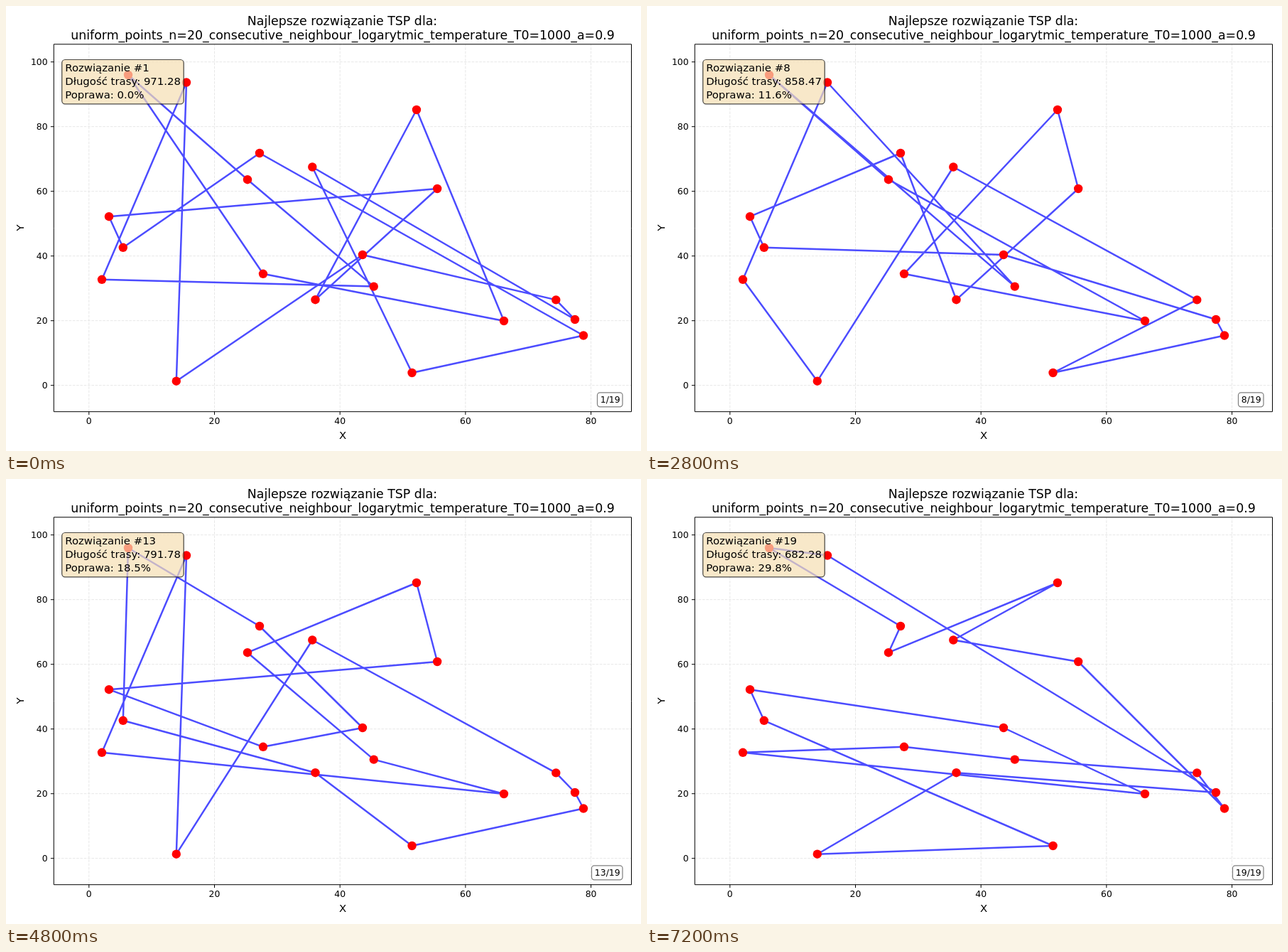
An HTML page with a canvas that plays this animation: 894 px wide and 626 px high, repeating every 7600 ms.

```html
<!DOCTYPE html>
<html lang="pl">
<head>
<meta charset="utf-8">
<style>
  html, body { margin: 0; width: 100%; height: 100%; overflow: hidden; background: #fff; }
  canvas { display: block; }
</style>
</head>
<body>
<canvas id="stage" width="894" height="626"></canvas>
<script>
const c = document.getElementById('stage').getContext('2d');
const STEP = 400;
const PT = 0.894 * 100 / 72; // pixels per typographic point
const LEFT = 67.3, RIGHT = 880.5, TOP = 53.8, BOTTOM = 570.7;

// Cities A..T in stage pixels
const cities = [
  [172, 97], [254, 107.5], [578, 146], [357, 207], [431.3, 226.5],
  [340, 244.2], [607.2, 257], [145, 296.2], [164.8, 339.8], [135, 384.8],
  [362, 376.8], [502, 350], [517.8, 394.6], [435.5, 413.2], [774.3, 413.4],
  [801, 441], [813, 463.5], [701, 443], [571.6, 516], [239.8, 527.7]
];

// Visiting order and route length of each improved solution
const tours = [
  ['BJMFAKRCNGHIDQSEPOLT', 971.28],
  ['BJMFAKRCNGDHIQSEPOLT', 945.02],
  ['BJMFAKRCGNDHIQSEPOLT', 924.51],
  ['BJMAFKRCGNDHIQSELPOT', 913.40],
  ['BJTPOLESQHIDNGCKRFAM', 907.83],
  ['BJTPOLEQSHIDNGCKRFAM', 894.09],
  ['BJTEOSQPLHIDNGCKRFAM', 867.76],
  ['BJTEOSQPLIHDNGCKRFAM', 858.47],
  ['BJTEOSQPLINDKHAGFCRM', 844.13],
  ['BJTEOSQPLINDKHAGCFRM', 831.52],
  ['BJTEOQPSLINDKHAGCFRM', 810.24],
  ['BJTEOPQSLINDKHAGCFRM', 804.11],
  ['JBTEOPQSNIADLKHGCFMR', 791.78],
  ['BJTEOPQSNIADLKHGFCMR', 779.24],
  ['BJTEOPQSNIADKLHGCFMR', 770.83],
  ['BJTEOPQSNIADLKHGCFMR', 757.13],
  ['BCDEFQOGMLKJHRISTPNA', 739.94],
  ['BANPTSIRHJKLMOQGFEDC', 707.37],
  ['ABPNTSIHLRJKMOQGECFD', 682.28]
];

function text(str, x, y, size, align) {
  c.font = size * PT + 'px "DejaVu Sans", sans-serif';
  c.textAlign = align;
  c.fillStyle = '#000';
  c.fillText(str, x, y);
}

function line(x1, y1, x2, y2) {
  c.beginPath();
  c.moveTo(x1, y1);
  c.lineTo(x2, y2);
  c.stroke();
}

function box(x, y, w, h, r, fill, edge) {
  c.beginPath();
  c.roundRect(x, y, w, h, r);
  c.fillStyle = fill;
  c.fill();
  c.strokeStyle = edge;
  c.lineWidth = PT;
  c.stroke();
}

function tick(grid, mark) {
  c.strokeStyle = '#e7e7e7';
  c.setLineDash([3.7, 1.6]);
  line(...grid);
  c.strokeStyle = '#000';
  c.setLineDash([]);
  line(...mark);
}

function axes() {
  c.lineWidth = 1;
  for (let i = 0; i < 5; i++) {
    const x = 116.8 + i * 176.7;
    tick([x, BOTTOM, x, TOP], [x, BOTTOM, x, BOTTOM + 4.4]);
    text(i * 20, x, 588.3, 10, 'center');
  }
  for (let i = 0; i < 6; i++) {
    const y = 533.7 - i * 91;
    tick([LEFT, y, RIGHT, y], [LEFT - 4.4, y, LEFT, y]);
    text(i * 20, 58.6, y + 4.6, 10, 'right');
  }
  text('X', 474, 609, 12, 'center');
  c.save();
  c.translate(25, 312);
  c.rotate(-Math.PI / 2);
  text('Y', 0, 0, 12, 'center');
  c.restore();
  text('Najlepsze rozwiązanie TSP dla:', 473.5, 26.7, 14, 'center');
  text('uniform_points_n=20_consecutive_neighbour_logarytmic_temperature_T0=1000_a=0.9',
    474, 46.6, 14, 'center');
}

function route(order) {
  c.beginPath();
  for (const ch of order) c.lineTo(...cities[ch.charCodeAt(0) - 65]);
  c.closePath();
  c.strokeStyle = '#4c4cff';
  c.lineWidth = 2 * PT;
  c.lineJoin = 'round';
  c.stroke();
  c.fillStyle = '#f00';
  for (const [x, y] of cities) {
    c.beginPath();
    c.arc(x, y, 6.2, 0, Math.PI * 2);
    c.fill();
  }
}

function draw(now) {
  const i = Math.floor(now / STEP) % tours.length;
  const [order, length] = tours[i];
  const gain = (1 - length / tours[0][1]) * 100;

  c.fillStyle = '#fff';
  c.fillRect(0, 0, 894, 626);
  axes();
  route(order);
  c.strokeStyle = '#000';
  c.lineWidth = 1;
  c.strokeRect(LEFT, TOP, RIGHT - LEFT, BOTTOM - TOP);

  box(78.7, 75.5, 171.5, 62.3, 4.5, 'rgba(245,222,179,.7)', 'rgba(0,0,0,.7)');
  text('Rozwiązanie #' + (i + 1), 83.2, 92, 12, 'left');
  text('Długość trasy: ' + length.toFixed(2), 83.2, 111, 12, 'left');
  text('Poprawa: ' + gain.toFixed(1) + '%', 83.2, 129.8, 12, 'left');

  const left = i < 9 ? 832.5 : 824.5;
  box(left, 543.8, 868 - left, 20, 3.75, 'rgba(255,255,255,.8)', '#808080');
  text(i + 1 + '/' + tours.length, 864.6, 558, 10, 'right');
}

const start = performance.now();
function loop() {
  draw(performance.now() - start);
  requestAnimationFrame(loop);
}
loop();
</script>
</body>
</html>
```
